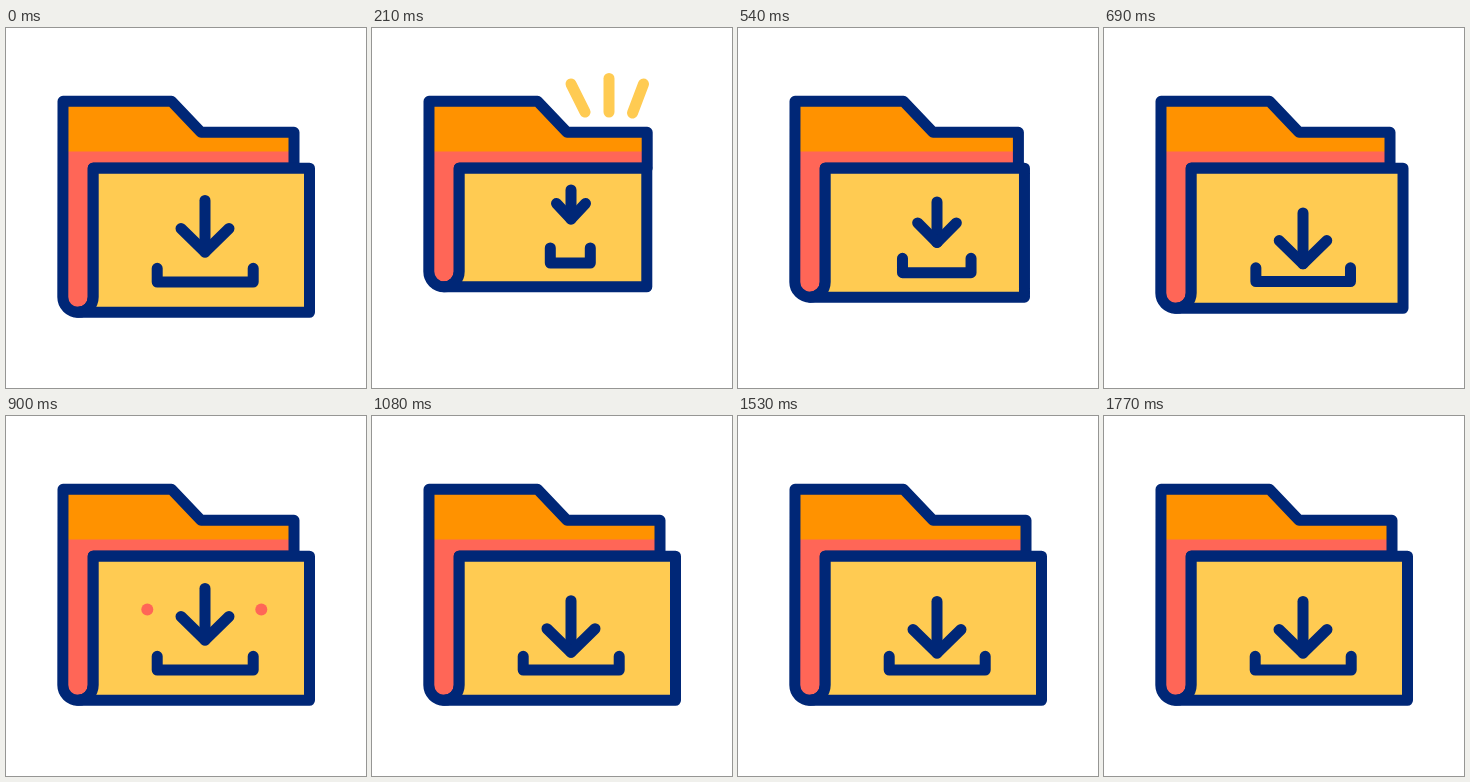
These frames come from a looping animation (360x360 px, 1800 ms). An HTML page with a canvas:

```html
<!DOCTYPE html>
<html lang="en">
<head>
<meta charset="utf-8">
<title>Download folder</title>
<style>
html, body { margin: 0; width: 100%; height: 100%; overflow: hidden; background: #fff; }
canvas { display: block; width: 360px; height: 360px; }
</style>
</head>
<body>
<canvas id="stage"></canvas>
<script>
const LOOP = 1800, STEP = 30;
const NAVY = '#002777', ORANGE = '#ff9200', CORAL = '#ff6657', YELLOW = '#ffcb52';
const canvas = document.getElementById('stage');
const ctx = canvas.getContext('2d');
const dpr = window.devicePixelRatio || 1;
canvas.width = canvas.height = 360 * dpr;

const lerp = (a, b, p) => a + (b - a) * p;
const ramp = (t, a, b) => Math.min(1, Math.max(0, (t - a) / (b - a)));
const ease = (t, a, b) => { const p = ramp(t, a, b); return p * p * (3 - 2 * p); };

function line(points, color = NAVY, width = 11) {
  ctx.beginPath();
  points.forEach(([x, y]) => ctx.lineTo(x, y));
  ctx.strokeStyle = color;
  ctx.lineWidth = width;
  ctx.stroke();
}

function dot(x, y, r) {
  if (r <= 0) return;
  ctx.beginPath();
  ctx.arc(x, y, r, 0, Math.PI * 2);
  ctx.fillStyle = CORAL;
  ctx.fill();
}

function drawRays(t) {
  const head = ease(t, 90, 210), tail = ease(t, 220, 360);
  if (head <= 0 || tail >= 1) return;
  [[213, 84, 199, 56], [237, 84, 237, 50.5], [260.5, 85, 271.5, 56]].forEach(([x0, y0, x1, y1]) => {
    const at = p => [lerp(x0, x1, p), lerp(y0, y1, p)];
    line([at(tail), at(head)], YELLOW, 11);
  });
}

function drawFolder(s) {
  const right = lerp(303.5, 274.8, s), bottom = lerp(284.3, 258.8, s);
  const backRight = lerp(288, 275.2, s);

  // Back sheet with its two colour bands
  const back = new Path2D();
  back.moveTo(72, bottom);
  back.arc(72, bottom - 15.2, 15.2, Math.PI / 2, Math.PI);
  [[57, 73.3], [165.5, 73.3], [195, 104.3], [backRight, 104.3], [backRight, 140]]
    .forEach(([x, y]) => back.lineTo(x, y));
  back.lineTo(87.2, 140);
  back.lineTo(87.2, bottom - 15.2);
  back.arc(72, bottom - 15.2, 15.2, 0, Math.PI / 2);
  back.closePath();
  ctx.save();
  ctx.clip(back);
  ctx.fillStyle = CORAL;
  ctx.fillRect(50, 60, 250, 235);
  ctx.fillStyle = ORANGE;
  ctx.fillRect(50, 60, 250, 63.5);
  ctx.restore();
  ctx.strokeStyle = NAVY;
  ctx.lineWidth = 11;
  ctx.stroke(back);

  // Front panel
  const front = new Path2D();
  front.moveTo(72, bottom);
  front.arc(72, bottom - 15.2, 15.2, Math.PI / 2, 0, true);
  [[87.2, 140.2], [right, 140.2], [right, bottom]].forEach(([x, y]) => front.lineTo(x, y));
  front.closePath();
  ctx.fillStyle = YELLOW;
  ctx.fill(front);
  ctx.stroke(front);
}

function drawIcon(a, lift) {
  const rise = 13 * lift * (1 - a);
  const top = lerp(185.5, 162, a) - rise;
  const tip = lerp(237, 191, a) - rise;
  const wing = lerp(24, 14.5, a);
  const wingY = tip - lerp(23.5, 15.5, a);
  line([[199, top], [199, tip]]);
  line([[199 - wing, wingY], [199, tip], [199 + wing, wingY]]);

  const half = lerp(48, 20, a);
  const trayTop = lerp(240.3, 220, a), trayBottom = lerp(254, 235, a);
  const mid = lerp(199.2, 198.3, a);
  line([[mid - half, trayTop], [mid - half, trayBottom], [mid + half, trayBottom], [mid + half, trayTop]]);
}

function drawDots(t) {
  const r = 6 * ease(t, 780, 880) * (1 - ease(t, 920, 1050));
  const reach = lerp(40, 57, ease(t, 780, 900));
  dot(198.3 - reach, 193.5, r);
  dot(198.3 + reach, 193.5, r);
}

function draw(t) {
  ctx.setTransform(dpr, 0, 0, dpr, 0, 0);
  ctx.fillStyle = '#fff';
  ctx.fillRect(0, 0, 360, 360);
  ctx.lineCap = ctx.lineJoin = 'round';

  const shrink = ease(t, 0, 200);
  const size = shrink * (1 - ease(t, 330, 810));
  const icon = shrink * (1 - ease(t, 350, 725));
  const lift = t < 400 ? 1 : ease(t, 700, 890) * (1 - ease(t, 910, 1110));

  drawRays(t);
  drawFolder(size);
  drawDots(t);
  drawIcon(icon, lift);
}

const start = performance.now();
function frame(now) {
  const t = Math.max(0, now - start) % LOOP;
  draw(Math.floor(t / STEP) * STEP);
  requestAnimationFrame(frame);
}
draw(0);
requestAnimationFrame(frame);
</script>
</body>
</html>
```
